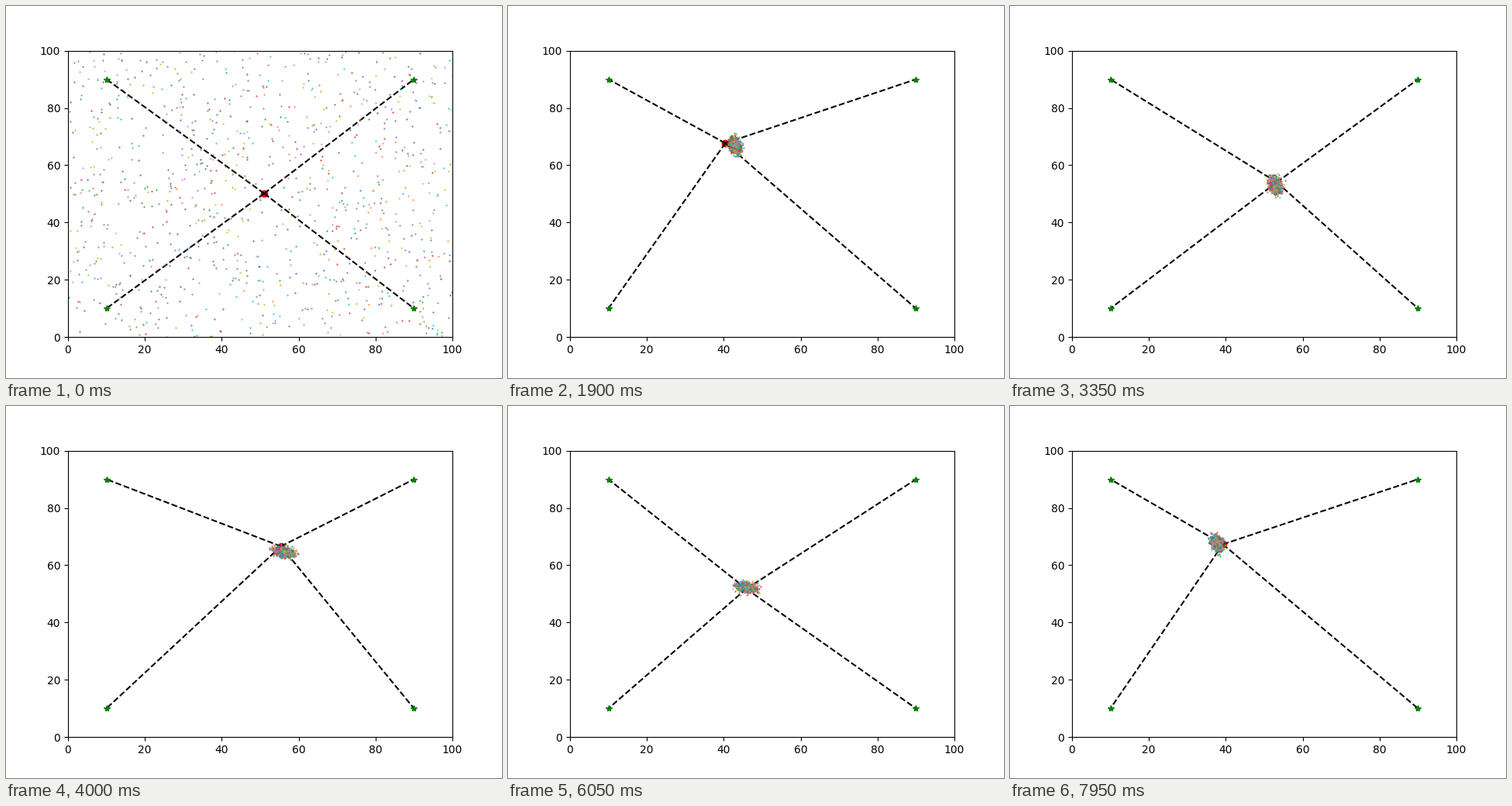
Write a matplotlib script that moves like this. It is 640 px wide and 480 px high and loops after 8000 ms.

```python
from itertools import product

import numpy as np
import matplotlib.pyplot as plt
from matplotlib.animation import FuncAnimation

FRAMES, COUNT, GROUPS = 160, 1000, 100
RADIUS = 10
LANDMARKS = list(product((10, 90), repeat=2))

# A few points on the way: step, robot, offset of the cloud from it
WAYPOINTS = [
    (0, 51.03 + 50.13j, 0),
    (38, 40.4 + 67.7j, 2.5 - 0.8j),
    (54, 41.0 + 53.1j, -1.5),
    (80, 55.4 + 66.6j, 0.6 - 1.9j),
    (103, 37.4 + 65.9j, 0.5 - 0.1j),
    (139, 54.4 + 63.2j, -0.2 + 1.2j),
    (159, 39.25 + 67.3j, -1.6 + 0.5j),
]
marks, places, offsets = map(np.array, zip(*WAYPOINTS))
steps = np.arange(FRAMES)


def bearing(step):
    return -1.47 + 0.103 * step


def circle(step):
    return RADIUS * np.exp(1j * bearing(step))


# The robot drives in circles whose centre drifts slowly.
robot_at = circle(steps) + np.interp(steps, marks, places - circle(marks))
cloud_at = robot_at + np.interp(steps, marks, offsets)


def build_cloud():
    rng = np.random.default_rng(7)
    cloud = np.empty((FRAMES, COUNT, 2))
    cloud[0] = rng.uniform(0, 100, (COUNT, 2))
    noise = rng.normal(size=(COUNT, 2))
    for i in range(1, FRAMES):
        noise = 0.8 * noise + 0.6 * rng.normal(size=(COUNT, 2))
        # The cloud settles quickly, then stretches with the bearing.
        size = 1 + 2.2 * np.exp(-(i - 1) / 4)
        swing = 0.35 * np.cos(2 * (bearing(i) - np.radians(150)))
        u, v = noise.T
        v = 0.97 * v - 0.25 * u
        cloud[i, :, 0] = cloud_at[i].real + size * (1.05 - swing) * u
        cloud[i, :, 1] = cloud_at[i].imag + size * (1.0 + swing) * v
    return cloud


cloud = build_cloud()

fig, ax = plt.subplots(figsize=(6.4, 4.8), dpi=100)
ax.set_xlim(0, 100)
ax.set_ylim(0, 100)

robot, = ax.plot([], [], 'ro')
beams = [ax.plot([], [], 'k--')[0] for _ in LANDMARKS]
ax.plot(*zip(*LANDMARKS), 'g*')
dots = [ax.plot([], [], '.', ms=1, color=f'C{g % 10}')[0] for g in range(GROUPS)]


def draw(i):
    x, y = robot_at[i].real, robot_at[i].imag
    robot.set_data([x], [y])
    for beam, (lx, ly) in zip(beams, LANDMARKS):
        beam.set_data([x, lx], [y, ly])
    for g, dot in enumerate(dots):
        dot.set_data(*cloud[i, g::GROUPS].T)
    return [robot, *beams, *dots]


anim = FuncAnimation(fig, draw, frames=FRAMES, interval=50, repeat=True,
                     repeat_delay=0)
plt.show()
```
